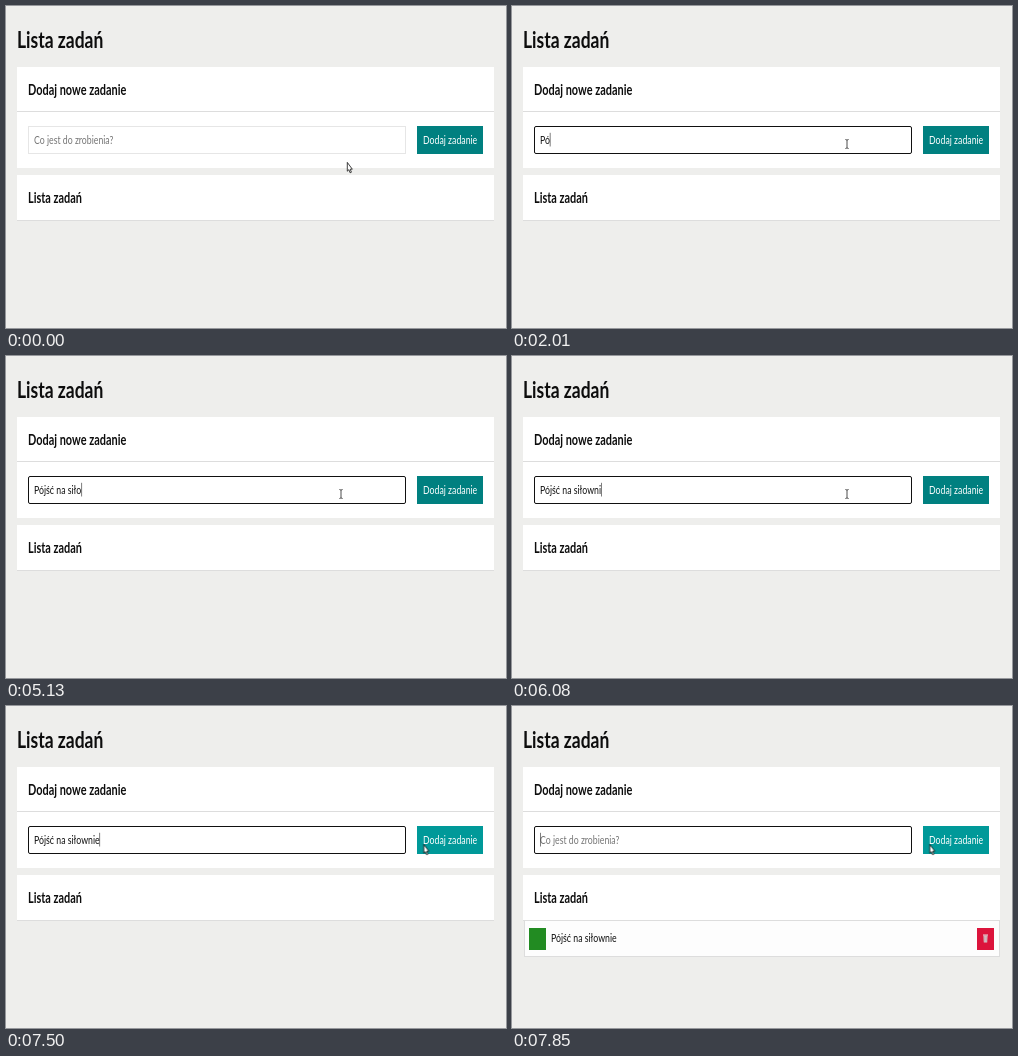
These frames come from a looping animation (500 px wide and 322 px high, 8000 ms). An HTML page:

```html
<!DOCTYPE html>
<html lang="pl">
<head>
<meta charset="utf-8">
<title>Lista zadań</title>
<style>
  html, body { margin: 0; width: 100%; height: 100%; overflow: hidden; background: #eeeeec; }
  body { position: relative; font: 16px Lato, sans-serif; color: #111; }
  body * { position: absolute; box-sizing: border-box; }

  /* The page is shown squeezed; every label shares the same scale.
     A label's "top" is the middle of its line. */
  .t {
    line-height: 0; white-space: pre;
    transform: scale(.546, .72); transform-origin: 0 0;
  }
  h1, h2 { margin: 0; font-weight: 700; color: #0d0d0d; }
  h1 { left: 11px; top: 33.2px; font-size: 32px; }
  h2 { left: 11px; top: 21.8px; font-size: 20px; }

  .card { left: 11px; width: 477px; background: #fff; }
  .card::before { content: ""; position: absolute; top: 44px; width: 100%; height: 1px; background: #ddd; }
  .form { top: 61px; height: 101px; }
  .list { top: 169px; height: 46px; }
  .list::before { top: 45px; }

  .field {
    left: 11px; top: 59px; width: 378px; height: 28px;
    border: 1px solid #e6e6e6;
    animation: focus 8s step-end infinite;
  }
  .field .t { left: 5.2px; top: 13.2px; }
  .hint { color: #757575; }
  .value span { position: static; border-right: 1px solid #111; animation: blink 8s step-end infinite; }

  .add {
    left: 400px; top: 59px; width: 66px; height: 28px;
    background: teal; color: #fff;
    animation: press 8s step-end infinite;
  }
  .add .t { left: 5.6px; top: 14.2px; }

  .item {
    left: 1px; top: 46px; width: 476px; height: 36px;
    background: #fdfdfd; border: solid #ddd; border-width: 0 1px 1px;
    animation: added 8s step-end infinite;
  }
  .item .t { left: 26.2px; top: 17.4px; }
  .done, .remove { top: 7px; width: 17px; height: 22px; }
  .done { left: 4px; background: forestgreen; }
  .remove { left: 452px; background: crimson; }

  .pointer { left: 0; top: 0; overflow: visible; }
  .arrow { animation: arrow 8s infinite; }
  .beam { animation: beam 8s infinite; }

  @keyframes focus {
    0%, 97.25% { border: 1px solid #e6e6e6; border-radius: 0; }
    7.875%, 98.125%, 100% { border: 1.4px solid #111; border-radius: 2px; }
  }
  @keyframes blink {
    0%, 14.375%, 87.625%, 97.25% { border-color: transparent; }
    7.875%, 19.375%, 93.75%, 98.125%, 100% { border-color: #111; }
  }
  @keyframes press {
    0% { background: #008080; }
    89.375%, 98.125%, 100% { background: #099; }
    97.25% { background: #00b3b3; }
  }
  @keyframes added {
    0% { visibility: hidden; }
    98.125%, 100% { visibility: visible; }
  }
  @keyframes arrow {
    0% { transform: translate(341px, 156px); opacity: 1; animation-timing-function: step-end; }
    .75% { transform: translate(340px, 154px); opacity: 1; animation-timing-function: steps(3); }
    3.375% { transform: translate(337px, 148px); opacity: 1; }
    3.376% { transform: translate(337px, 148px); opacity: 0; animation-timing-function: step-end; }
    89.375% { transform: translate(404px, 139px); opacity: 1; animation-timing-function: steps(4); }
    92.875%, 100% { transform: translate(417.5px, 138px); opacity: 1; }
  }
  @keyframes beam {
    0% { transform: translate(336px, 146px); opacity: 0; animation-timing-function: step-end; }
    3.375% { transform: translate(336px, 145px); opacity: 1; animation-timing-function: steps(3); }
    6%  { transform: translate(335px, 138px); opacity: 1; animation-timing-function: step-end; }
    87.625% { transform: translate(362px, 139.5px); opacity: 1; animation-timing-function: step-end; }
    88.5% { transform: translate(386px, 139.5px); opacity: 1; animation-timing-function: step-end; }
    89.375%, 100% { transform: translate(404px, 139px); opacity: 0; }
  }
</style>
</head>
<body>
  <h1 class="t">Lista zadań</h1>

  <div class="card form">
    <h2 class="t">Dodaj nowe zadanie</h2>
    <div class="field">
      <div class="t hint">Co jest do zrobienia?</div>
      <div class="t value"><span></span></div>
    </div>
    <div class="add"><div class="t">Dodaj zadanie</div></div>
  </div>

  <div class="card list">
    <h2 class="t">Lista zadań</h2>
    <div class="item">
      <div class="done"></div>
      <div class="t">Pójść na siłownie</div>
      <svg class="remove" viewBox="0 0 17 22">
        <path d="M6.4 7.4h4.2l-.4 7.2h-3.4z" fill="#d8c4c8"/>
        <path d="M6 7h5" stroke="#e8dcde" fill="none"/>
        <path d="M7.7 8.4v5.4M9.3 8.4v5.4" stroke="#b98f98" stroke-width=".5"/>
      </svg>
    </div>
  </div>

  <svg class="pointer" width="1" height="1">
    <g class="beam">
      <path d="M-1.6-4.5Q0-4.5 0-3.5Q0-4.5 1.6-4.5M0-3.5V3.5M-1.6 4.5Q0 4.5 0 3.5Q0 4.5 1.6 4.5"
            fill="none" stroke="#222" stroke-width=".8"/>
    </g>
    <g class="arrow">
      <path d="M.3.4V9.2L1.9 7.7 3.1 10.8 4.4 10.2 3.2 7.2H5.3Z"
            fill="#fff" stroke="#111" stroke-width=".8"/>
    </g>
  </svg>

<script>
  const LOOP = 8000, SENT = 7850;
  const task = 'Pójść na siłownie';
  const keys = [1550, 2010, 2280, 2680, 3160, 3550, 3680, 3810, 4140,
                4340, 4600, 4930, 5130, 5610, 5810, 6080, 6480];
  const value = document.querySelector('.value span');
  const hint = document.querySelector('.hint');
  let start;

  function render(now) {
    start ??= now;
    const t = (now - start) % LOOP;
    const count = t < SENT ? keys.filter(k => k <= t).length : 0;
    value.textContent = task.slice(0, count);
    hint.style.visibility = count ? 'hidden' : 'visible';
    requestAnimationFrame(render);
  }
  requestAnimationFrame(render);
</script>
</body>
</html>
```
